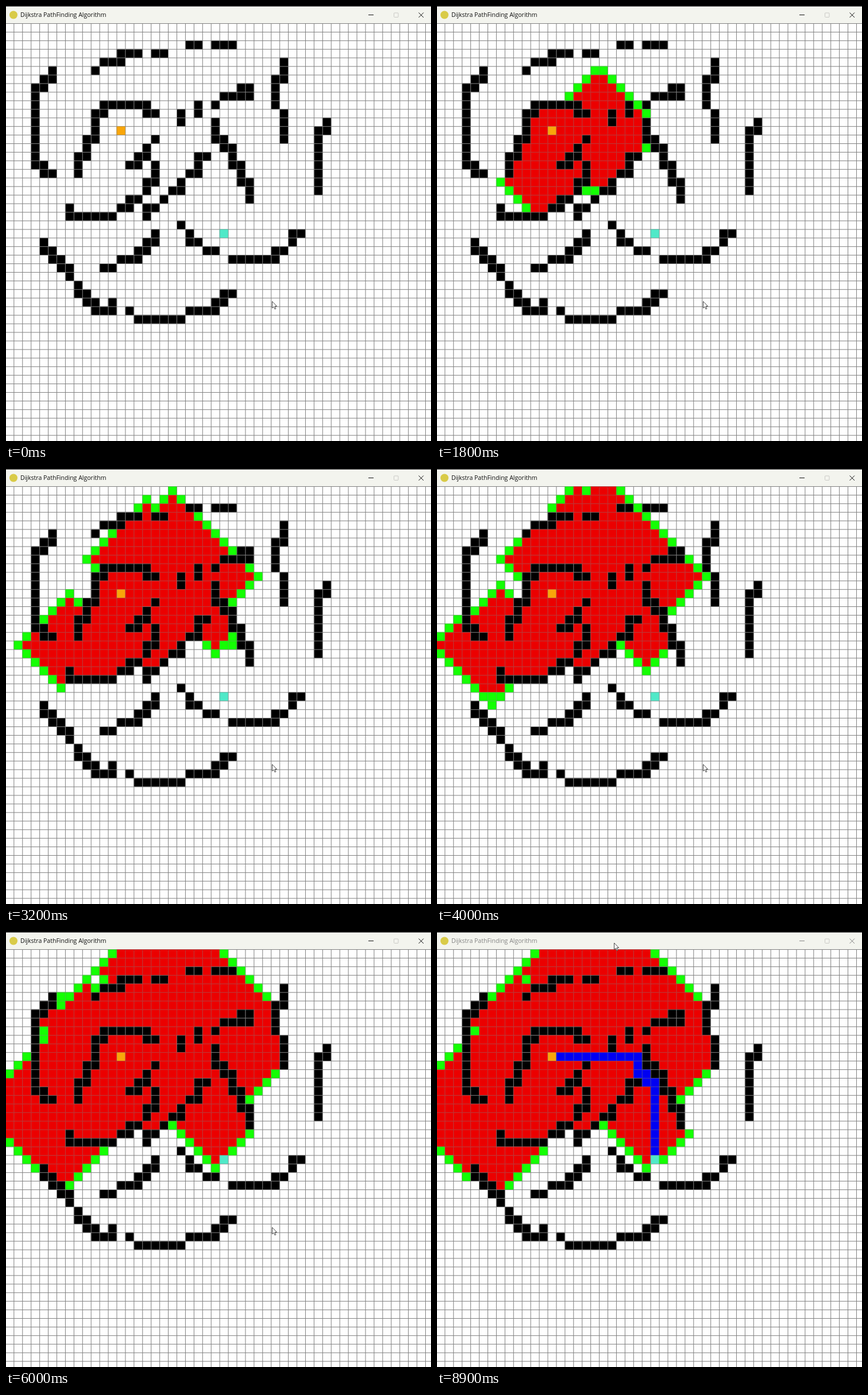
These frames come from a looping animation (740 by 757 pixels, 9000 ms). An HTML page with a canvas:

```html
<!DOCTYPE html>
<html lang="en">
<head>
<meta charset="utf-8">
<title>Dijkstra PathFinding Algorithm</title>
<style>
  html, body { margin: 0; width: 100%; height: 100%; overflow: hidden; background: #fff; }
  canvas, .bar, .pointer { position: absolute; left: 0; top: 0; }
  .bar {
    box-sizing: border-box; width: 740px; height: 30px;
    background: #f3f4ee; border-top: 1.5px solid #333;
    color: #111;
  }
  .bar.idle { color: #858585; }
  .bar span {
    position: absolute; left: 25px; top: 5.5px; line-height: 16px; white-space: nowrap;
    font: 10.56px/16px "Open Sans", "Noto Sans", sans-serif;
  }
  .bar svg { position: absolute; left: 0; top: -1.5px; }
</style>
</head>
<body>
<canvas id="grid" width="740" height="757"></canvas>
<div class="bar" id="bar">
  <svg width="740" height="30" fill="none" stroke="currentColor">
    <circle cx="13" cy="15.5" r="7" fill="#d9cb48" stroke="none"/>
    <path d="M631 15.5h9M718.5 11.5l8.5 8.5m0-8.5l-8.5 8.5"/>
    <rect x="675.5" y="12" width="7.5" height="7.5" rx="1" stroke="#c9c9c5"/>
  </svg>
  <span>Dijkstra PathFinding Algorithm</span>
</div>
<svg class="pointer" id="pointer" width="12" height="18">
  <path d="M.5 .5V12.2L3.2 9.7 5 14 6.9 13.2 5.1 9H8.6Z" fill="#fff" stroke="#333" stroke-width=".9"/>
</svg>
<script>
const LOOP = 9000, STEP = 100;
const SIZE = 50, PITCH = 14.93, LEFT = -1.6, TOP = 30;
const COLOR = {
  wall: '#000', open: '#14ff04', closed: '#ea0000',
  path: '#0000f2', start: '#f9a60a', end: '#50e8c8'
};
const START = [13, 12], END = [25, 24];

// Lower case: n e s w. Upper case: the diagonal 45 degrees clockwise of it.
const MOVES = {
  n: [0, -1], e: [1, 0], s: [0, 1], w: [-1, 0],
  N: [1, -1], E: [1, 1], S: [-1, 1], W: [-1, -1]
};
const STROKES = [
  '21,2 e', '24,2 ee', '10,5 Neenee', '17,3 e',
  '5,5 swswsssssssssese', '32,4 sswsssEsss', '27,7 eswwwS', '37,11 swsssssss',
  '8,17 nnennennneneeeeese', '20,10 s', '22,9 s', '24,11 ssesessessess',
  '17,13 Sswsw', '17,16 sswsSwswSwwwwwn', '23,15 wsswSswSSws',
  '20,23 EseEe', '26,27 eeeeeneNne', '17,24 swswswwSw',
  '4,25 sesesesEseseseen', '14,33 EeeeeeNeeenene'
];

const id = (x, y) => y * SIZE + x;
const startId = id(...START), endId = id(...END);

const walls = new Set();
for (const stroke of STROKES) {
  const [at, moves] = stroke.split(' ');
  let [x, y] = at.split(',').map(Number);
  walls.add(id(x, y));
  for (const m of moves) {
    x += MOVES[m][0];
    y += MOVES[m][1];
    walls.add(id(x, y));
  }
}

// Uniform-cost search: visit order, and the visit that opened each cell.
const queue = [startId], visit = new Map(), opened = new Map([[startId, 0]]), parent = new Map();
for (let i = 0; i < queue.length; i++) {
  const cell = queue[i], cx = cell % SIZE, cy = Math.floor(cell / SIZE);
  visit.set(cell, i);
  if (cell === endId) break;
  for (const m of 'ewsn') {
    const x = cx + MOVES[m][0], y = cy + MOVES[m][1], next = id(x, y);
    if (x < 0 || y < 0 || x >= SIZE || y >= SIZE || walls.has(next) || opened.has(next)) continue;
    opened.set(next, i);
    parent.set(next, cell);
    queue.push(next);
  }
}
const route = [];
for (let c = parent.get(endId); c !== startId; c = parent.get(c)) route.push(c);

function track(keys, t) {
  if (t <= keys[0][0]) return keys[0][1];
  for (let i = 1; i < keys.length; i++) {
    const [t0, a] = keys[i - 1], [t1, b] = keys[i];
    if (t <= t1) return a + (b - a) * (t - t0) / (t1 - t0);
  }
  return keys[keys.length - 1][1];
}

const seen = (x, y) => visit.get(id(x, y));
const SEARCH = [
  [200, -1], [1800, seen(18, 19)], [3200, seen(26, 17)],
  [4000, seen(6, 24)], [5100, seen(4, 12)], [6350, visit.get(endId)]
];
const TRACE = [[6350, 0], [6850, route.length]];
const POINTER_X = [[7800, 463], [8200, 428], [8700, 308]];
const POINTER_Y = [[7800, 513.5], [8200, 368], [8700, 18.5]];

const ctx = document.getElementById('grid').getContext('2d');
const bar = document.getElementById('bar'), pointer = document.getElementById('pointer');

function fillCell(cell, color) {
  ctx.fillStyle = color;
  ctx.fillRect(LEFT + cell % SIZE * PITCH, TOP + Math.floor(cell / SIZE) * PITCH, PITCH + 0.4, PITCH + 0.4);
}

function drawLines() {
  ctx.fillStyle = '#808080';
  for (let i = 0; i <= SIZE; i++) {
    ctx.fillRect(LEFT + i * PITCH, TOP, 1, 757);
    ctx.fillRect(0, TOP + i * PITCH, 740, 1);
  }
}

function cellsAt(t) {
  const cells = new Map(), now = Math.round(track(SEARCH, t));
  for (const [cell, at] of opened) {
    if (at > now) continue;
    cells.set(cell, visit.has(cell) && visit.get(cell) < now ? 'closed' : 'open');
  }
  route.slice(0, Math.round(track(TRACE, t))).forEach(cell => cells.set(cell, 'path'));
  return cells.set(startId, 'start').set(endId, 'end');
}

function draw(t) {
  const cells = cellsAt(t);
  const paint = () => cells.forEach((kind, cell) => fillCell(cell, COLOR[kind]));
  ctx.fillStyle = '#fefefe';
  ctx.fillRect(0, 0, 740, 757);
  paint();
  walls.forEach(cell => fillCell(cell, COLOR.wall));
  drawLines();
  // Tint the grid lines inside coloured cells.
  ctx.globalAlpha = 0.45;
  paint();
  ctx.globalAlpha = 1;

  bar.classList.toggle('idle', t >= 8700);
  pointer.style.transform = `translate(${track(POINTER_X, t)}px, ${track(POINTER_Y, t)}px)`;
}

let last = -1;
const began = performance.now();
function tick() {
  const t = Math.floor((performance.now() - began) % LOOP / STEP) * STEP;
  if (t !== last) draw(last = t);
  requestAnimationFrame(tick);
}
tick();
</script>
</body>
</html>
```
